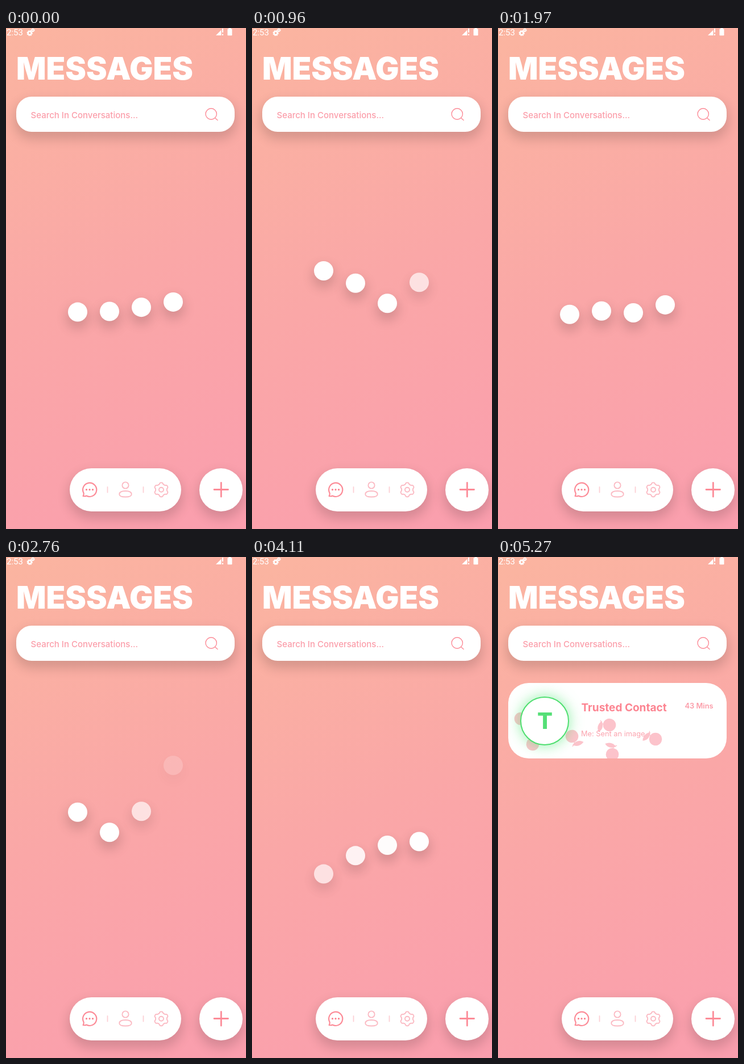
Write an HTML page that moves like this. It is 422 px wide and 883 px high and loops after 6920 ms.

```html
<!DOCTYPE html>
<html lang="en">
<head>
<meta charset="utf-8">
<title>Messages</title>
<style>
html, body { margin: 0; width: 100%; height: 100%; overflow: hidden; }
#stage {
  position: relative; width: 422px; height: 883px; overflow: hidden;
  background: linear-gradient(154.5deg, #fbb5a0, #faa7a7 50%, #fa9eae);
}
#stage > *, .avatar { position: absolute; }
.panel, .dot { background: #fff; box-shadow: 0 10px 20px 3px rgba(0, 0, 0, .15); }
.dot { width: 34px; height: 34px; top: -17px; border-radius: 50%; }
#card {
  left: 18px; top: 222px; width: 384px; height: 133px;
  border-radius: 36px; background: #fff; overflow: hidden;
}
#card svg { position: absolute; left: 0; top: 0; }
.avatar {
  left: 21px; top: 23.5px; width: 82px; height: 82px; border-radius: 50%;
  background: #fff; border: 2px solid #4fdf70; box-shadow: 0 0 24px rgba(70, 230, 110, .6);
}
svg { display: block; overflow: visible; }
text { font-family: Inter, sans-serif; font-optical-sizing: none; }
.line { fill: none; stroke-linecap: round; stroke-linejoin: round; }
</style>
</head>
<body>
<div id="stage">
  <div class="panel" style="left:18px;top:121.4px;width:384px;height:62px;border-radius:27px"></div>
  <div class="panel" style="left:112px;top:776px;width:195.6px;height:75.5px;border-radius:38px"></div>
  <div class="panel" style="left:340.3px;top:776px;width:75.6px;height:75.6px;border-radius:50%"></div>

  <svg width="422" height="883">
    <g fill="#fff">
      <text x="1" y="12.5" font-size="15" style="font-family:Roboto,sans-serif">2:53</text>
      <g fill="none" stroke="#fff">
        <circle cx="41.7" cy="9" r="3" stroke-width="2.4"/>
        <circle cx="41.7" cy="9" r="4.5" stroke-width="1.4" stroke-dasharray="2 1.53"/>
        <circle cx="47.3" cy="3.8" r="1.8" stroke-width="1.6"/>
        <circle cx="47.3" cy="3.8" r="2.9" stroke-width="1" stroke-dasharray="1.3 .98"/>
      </g>
      <path d="M369 13L378.5 3.5V13zM380 1h2v7h-2zM380 10.5h2V13h-2z"/>
      <path d="M391.500 1.500V0h4v1.500h1.200q.8 0 .8 .8V12.500q0 .8-.8 .8h-6.400q-.8 0-.8-.8V2.300q0-.8 .8-.8z"/>
      <text x="18" y="90.5" font-size="55" font-weight="900">MESSAGES</text>
    </g>
    <text x="43.5" y="158.500" font-size="15" font-weight="500" fill="#fb9eaa">Search In Conversations...</text>
    <g class="line" stroke="#fc8b97">
      <path d="M368 159L372 162.5" stroke-width="1.4"/>
      <circle cx="360.7" cy="151.5" r="9.7" stroke-width="1.4"/>
      <path d="M366 813.5H390.500M378.300 801.5V826" stroke-width="2.8"/>
      <path d="M135.600 825Q139 825.700 141.500 824.500A12.100 12.100 0 1 0 136.600 819.700Q137.300 822 135.600 825z" stroke-width="2.2"/>
    </g>
    <g fill="#fc8490">
      <circle cx="141.5" cy="813.7" r="1.6"/>
      <circle cx="147" cy="813.7" r="1.6"/>
      <circle cx="152.5" cy="813.7" r="1.6"/>
    </g>
    <path class="line" stroke="#fcd0d5" stroke-width="1.8" d="M178.500 809V818.500M241.500 809V818.500"/>
    <g class="line" stroke="#fbbac3" stroke-width="1.9">
      <circle cx="210" cy="806" r="5.6"/>
      <path d="M210 816C217 816 220.700 818.500 220.700 821.700S217 826.500 210 826.500S199.300 825 199.300 821.700S203 816 210 816z"/>
      <circle cx="273" cy="813.8" r="4"/>
      <path id="gear"/>
    </g>
  </svg>

  <div id="card">
    <svg id="fruit" width="384" height="133"></svg>
    <div class="avatar"></div>
    <svg width="384" height="133">
      <text x="64.5" y="80.5" font-size="40" font-weight="800" text-anchor="middle" fill="#55df77">T</text>
      <text x="128.5" y="50" font-size="19" font-weight="700" fill="#fc8491">Trusted Contact</text>
      <text x="360.5" y="44.5" font-size="12.8" font-weight="600" text-anchor="end" fill="#fb9ca8">43 Mins</text>
      <text x="128" y="94" font-size="12.8" fill="#fba3ae">Me: Sent an image</text>
    </svg>
  </div>
</div>
<script>
const LOOP = 6920, CYCLE = 1900, LAG = 100, START = 30;
const REST = 503.5, DROP = 333, FALL = 1 / 2.75;
const stage = document.getElementById('stage');
const card = document.getElementById('card');

const dots = [125.5, 181.7, 238, 294.3].map(x => {
  const d = document.createElement('div');
  d.className = 'dot';
  d.style.left = x - 17 + 'px';
  return stage.appendChild(d);
});

// Six-lobed cog outline
let cog = '';
for (let a = 0; a < 360; a += 3) {
  const r = 11.2 - 1.3 * Math.tanh(2 * Math.cos(6 * a * Math.PI / 180));
  const q = a * Math.PI / 180;
  cog += (a ? 'L' : 'M') + (273 + r * Math.cos(q)).toFixed(2) + ' ' + (813.8 + r * Math.sin(q)).toFixed(2);
}
document.getElementById('gear').setAttribute('d', cog + 'z');

// x, y, rotation
const fruits = [[22, 63, 90], [43, 108, 20], [112, 94, 145], [178, 74, -94], [259, 99, -68], [183, 126, -5]];
document.getElementById('fruit').innerHTML = fruits.map(([x, y, a]) =>
  `<g transform="translate(${x} ${y}) rotate(${a})" fill="#fcc3cb">
    <circle r="11.3"/>
    <path d="M-11 -20Q1 -24 8 -13Q-6 -9 -11 -20z"/>
    <path class="line" stroke="#fcc3cb" stroke-width="1.3" d="M1 -9Q3 -14 9 -15"/>
  </g>`).join('');

function bounce(t) {
  const k = 7.5625;
  if (t < FALL) return k * t * t;
  if (t < 2 * FALL) return k * (t - 1.5 * FALL) ** 2 + .75;
  if (t < 2.5 * FALL) return k * (t - 2.25 * FALL) ** 2 + .9375;
  return k * (t - 2.625 * FALL) ** 2 + .984375;
}

const clamp = v => Math.min(1, Math.max(0, v));

function drawDot(dot, i, t) {
  const p = (t - START - LAG * i) / CYCLE;
  const turn = Math.floor(p), u = p - turn, b = bounce(u);
  const falling = u < FALL;
  // The old dot drops out during the first half of the fall, the new one drops in
  const leaving = falling && (b < .5 || turn === 2);
  const y = REST + DROP * (leaving ? b : b - 1);
  dot.style.transform = `translateY(${y}px)`;
  dot.style.opacity = t >= 4410 ? 0 : falling ? Math.abs(1 - 2 * b) : 1;
}

function drawCard(t) {
  const rise = clamp((t - 4680) / 240), settle = clamp((t - 5170) / 100);
  const ease = 1 - (1 - rise) ** 2;
  card.style.opacity = t < 4710 ? 0 : ease;
  card.style.transform = `translateY(${48 - 58 * ease + 10 * settle}px)`;
}

function frame() {
  const t = performance.now() % LOOP;
  dots.forEach((d, i) => drawDot(d, i, t));
  drawCard(t);
  requestAnimationFrame(frame);
}
frame();
</script>
</body>
</html>
```
